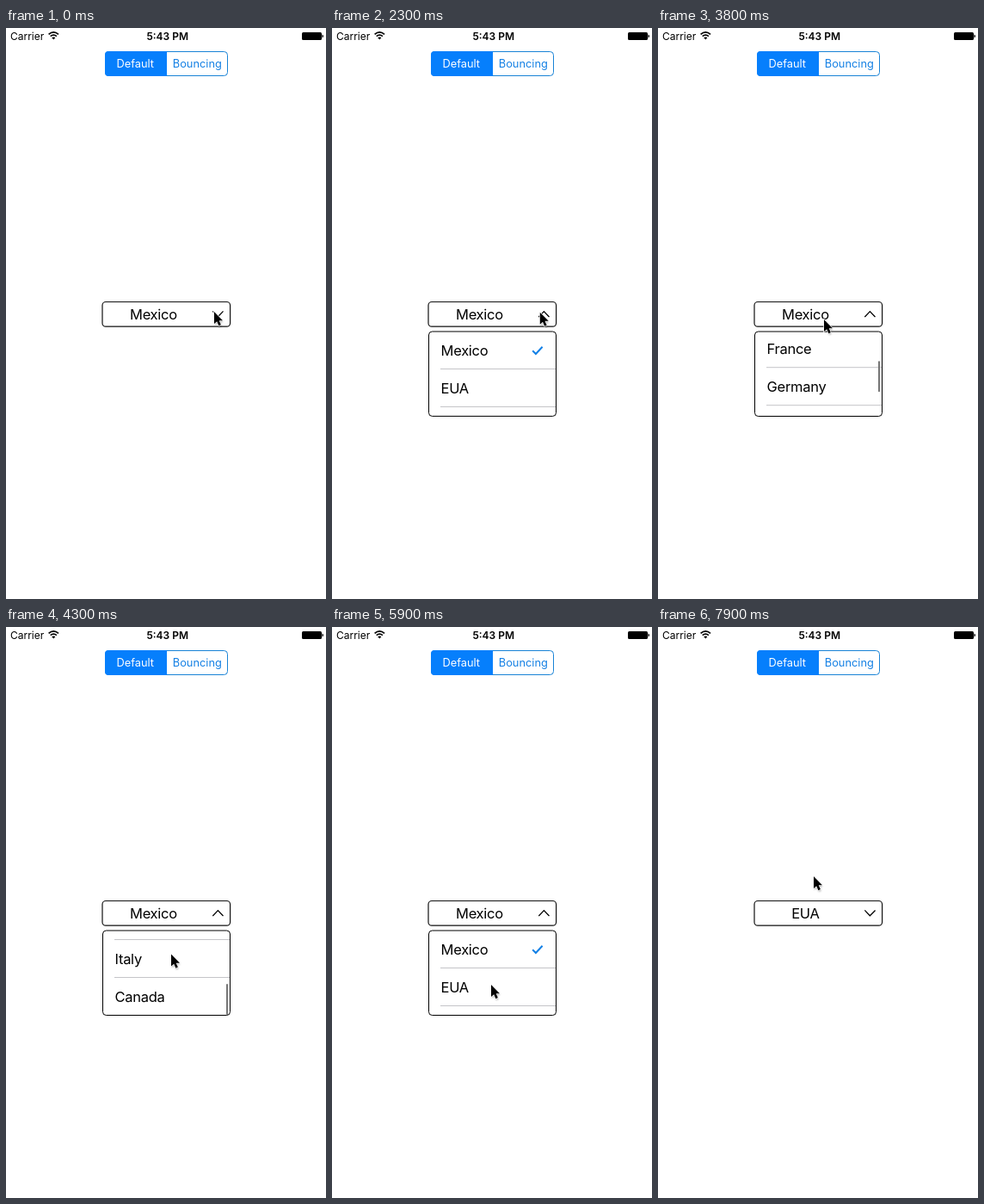
Animation of 372 by 664 pixels, one loop 8 s. Source, as an HTML page:

```html
<!DOCTYPE html>
<html lang="en">
<head>
<meta charset="utf-8">
<title>Drop-down menu</title>
<style>
  html, body { margin: 0; height: 100%; overflow: hidden; background: #fff; }
  svg { display: block; width: 100vw; height: 100vh; font-family: Inter, "Liberation Sans", sans-serif; }
  .item { font-size: 16.5px; letter-spacing: -.3px; }
  .status { font-size: 12px; }
  .segment { font-size: 12.8px; text-anchor: middle; }
  .line { fill: none; stroke: #000; }
</style>
</head>
<body>
<svg viewBox="0 0 372 664">
  <defs>
    <clipPath id="listClip"><rect id="clipBox" x="112.5" width="148" rx="4"/></clipPath>
    <filter id="soft" x="-50%" y="-50%" width="200%" height="200%"><feGaussianBlur stdDeviation="1"/></filter>
  </defs>

  <!-- status bar -->
  <text class="status" x="5" y="13.8">Carrier</text>
  <g class="line" stroke-width="1.7">
    <path d="M49.6 7.4Q55.3 2.4 61 7.4M51.7 9.6Q55.3 6.6 58.9 9.6"/>
    <path d="M53.2 11.2Q55.3 9.6 57.4 11.2L55.3 13.4Z" fill="#000" stroke="none"/>
  </g>
  <text class="status" x="187.7" y="13.8" font-weight="600" text-anchor="middle">5:43 PM</text>
  <rect x="344" y="5" width="23" height="9" rx="1.5"/>
  <path d="M367.5 7.5q1.5 .4 1.5 2t-1.5 2z"/>

  <!-- segmented control -->
  <rect x="115.5" y="27.5" width="142" height="28" rx="4" fill="#fff" stroke="#1983d6"/>
  <path d="M187 27V56H119a4 4 0 0 1-4-4V31a4 4 0 0 1 4-4z" fill="#067ffc"/>
  <text class="segment" x="150.3" y="46" fill="#fff">Default</text>
  <text class="segment" x="222.3" y="46" fill="#1580e4">Bouncing</text>

  <g id="list">
    <g clip-path="url(#listClip)">
      <rect x="112" y="300" width="150" height="200" fill="#fff"/>
      <g id="rows"></g>
      <path id="check" d="M233.2 22.3L236.9 26L244.6 17.8" fill="none" stroke="#1481e6" stroke-width="2"/>
      <rect id="bar" x="256" width="2" rx="1" fill="#777"/>
    </g>
    <rect id="frame" class="line" x="112.5" width="148" rx="4" stroke="#222"/>
  </g>

  <rect x="112" y="318.5" width="148.6" height="28.7" rx="4" fill="#fff" stroke="#111" stroke-width="1.2"/>
  <text id="title" class="item" x="171.4" y="338.8" text-anchor="middle"></text>
  <path id="arrow" class="line" d="M240.3 329.4L246.4 335.8L252.5 329.4" stroke-width="1.3"/>

  <g id="cursor">
    <path id="pointer" d="M0 0V14L3.2 11.2L5.4 16.2L7.9 15.1L5.7 10.2H10Z" transform="translate(.6 1.6)" opacity=".4" filter="url(#soft)"/>
    <use href="#pointer" x="0" y="0" style="display:none"/>
    <path d="M0 0V14L3.2 11.2L5.4 16.2L7.9 15.1L5.7 10.2H10Z" stroke="#fff" stroke-width="1.4" paint-order="stroke"/>
  </g>
</svg>
<script>
const LOOP = 8000, OPEN = 1350, SELECT = 6350, CLOSE = 7250;
const ROW = 44, MAX_SCROLL = 253, BAR = 36;
const countries = ["Mexico", "EUA", "England", "France", "Germany", "Spain", "Italy", "Canada"];
const el = id => document.getElementById(id);
const set = (id, attrs) => { for (const k in attrs) el(id).setAttribute(k, attrs[k]); };
const clamp = v => Math.min(1, Math.max(0, v));
const mix = (a, b, p) => a + (b - a) * p;

// Keys are [time, value, value...]; values ease between neighbours.
const cursorKeys = [[2270, 242, 330], [2900, 211, 424], [3050, 211, 424], [3200, 206.5, 421.5],
  [3350, 206.5, 421.5], [3800, 193, 339], [3950, 192, 339], [4280, 192, 380.5], [4320, 192, 380.5],
  [4850, 192, 518.5], [5200, 192, 518.5], [5880, 185, 416], [6450, 185, 416], [6900, 182, 320],
  [7380, 182, 320], [7880, 181, 290]];
const scrollKeys = [[3370, 0], [4200, MAX_SCROLL], [4340, MAX_SCROLL], [4900, -12], [5300, 0]];
const barKeys = [[3350, 0], [3450, 1], [5400, 1], [5700, 0]];

function track(keys, t) {
  let i = keys.findIndex(k => k[0] > t);
  if (i < 0) return keys[keys.length - 1].slice(1);
  if (i === 0) return keys[0].slice(1);
  const [a, b] = [keys[i - 1], keys[i]];
  const p = (t - a[0]) / (b[0] - a[0]);
  return a.slice(1).map((v, n) => mix(v, b[n + 1], p * p * (3 - 2 * p)));
}

// Spring from 0 to 1 that settles in 0.9 s.
function spring(ms, damping) {
  if (ms <= 0) return 0;
  const s = ms / 1000, decay = 6.9 / .9, root = Math.sqrt(1 - damping ** 2);
  const w = decay / damping * root;
  return 1 - Math.exp(-decay * s) * (Math.cos(w * s) + damping / root * Math.sin(w * s));
}

el("rows").innerHTML = countries.map((name, i) =>
  `<text class="item" x="126.6" y="${i * ROW + 27.6}">${name}</text>
   <path d="M126 ${i * ROW + 43.5}H261" stroke="#c4c4c8"/>`).join("");

function draw(t) {
  const open = t < CLOSE ? spring(t - OPEN, .5) : 1 - spring(t - CLOSE, .9);
  const closing = t >= CLOSE;
  const top = mix(318, 353, open);
  const height = Math.max(0, mix(closing ? 0 : 29, 98.5, open));
  const [scroll] = track(scrollKeys, t);
  const chosen = t < SELECT ? 0 : 1;

  set("list", { opacity: clamp(open) });
  for (const id of ["clipBox", "frame"]) set(id, { y: top, height });
  set("rows", { transform: `translate(0 ${top - scroll})` });
  set("check", { transform: `translate(0 ${top - scroll + chosen * ROW})` });
  set("bar", {
    y: top + 3 + clamp(scroll / MAX_SCROLL) * 59,
    height: BAR + Math.min(0, scroll),
    opacity: track(barKeys, t)[0]
  });

  el("title").textContent = countries[chosen];
  set("title", { opacity: chosen ? clamp((t - SELECT) / 600) : 1 });
  set("arrow", { transform: `rotate(${180 * open} 246.4 332.7)` });
  set("cursor", { transform: `translate(${track(cursorKeys, t).join(" ")})` });
}

function tick() {
  draw(performance.now() % LOOP);
  requestAnimationFrame(tick);
}
tick();
</script>
</body>
</html>
```
